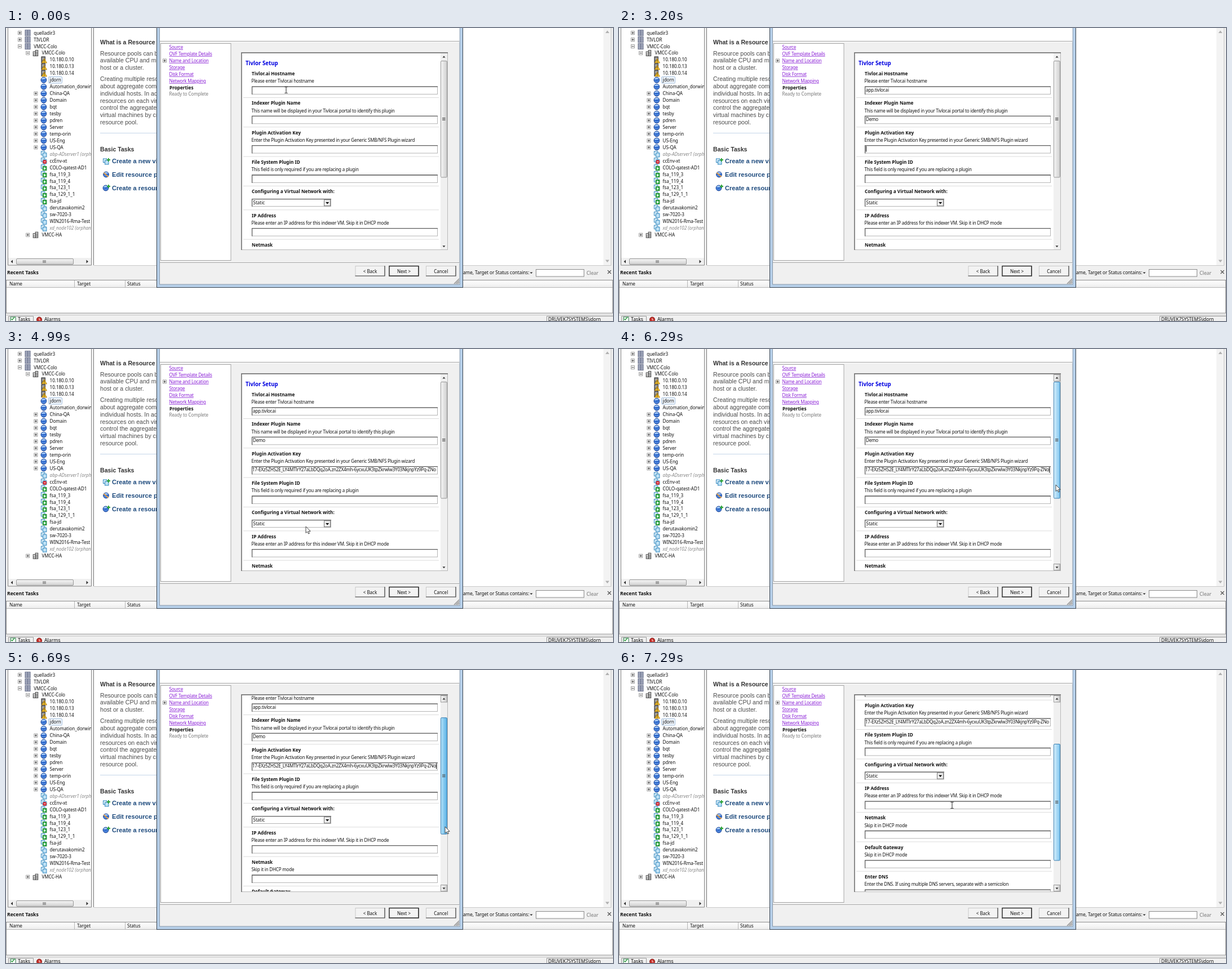
These frames come from a looping animation (1077x520 px, 7390 ms). An HTML page:

```html
<!DOCTYPE html>
<html lang="en">
<head>
<meta charset="utf-8">
<title>Deploy template: properties</title>
<style>
  html, body { margin: 0; width: 100%; height: 100%; overflow: hidden; background: #f0f0f0; }
  svg { display: block; width: 100%; height: 100%; }
  text { font: 8px "Noto Sans", "Open Sans", sans-serif; letter-spacing: -.18px; fill: #111; white-space: pre; }
  .tree { font-size: 8.1px; letter-spacing: -.04px; }
  .ital { font-style: italic; fill: #888; }
  .bold { font-size: 8.2px; font-weight: 700; letter-spacing: 0; }
  .title { font-size: 9.7px; font-weight: 700; letter-spacing: 0; fill: #0000e0; }
  .link { fill: #8a1fd6; text-decoration: underline; }
  .gray { fill: #777; }
  .btn { text-anchor: middle; letter-spacing: 0; }
  .key { letter-spacing: -.22px; }
  .page { font: 10.6px "Liberation Sans", Arial, sans-serif; letter-spacing: 0; fill: #4c4c4c; }
  .head { font-weight: 700; fill: #333; }
  .task { font-size: 11.1px; font-weight: 700; fill: #1d4a7d; }
  .bar { font-size: 8.2px; letter-spacing: -.06px; }
</style>
</head>
<body>
<svg id="stage" viewBox="0 0 1077 520" preserveAspectRatio="none"></svg>
<script>
const LOOP = 7390;
const stage = document.getElementById('stage');

const txt = (x, y, s, cls = '', more = '') =>
  `<text x="${x}" y="${y}" dy=".36em" class="${cls}" ${more}>${s}</text>`;
const box = (x, y, w, h, fill, stroke = 'none', more = '') =>
  `<rect x="${x}" y="${y}" width="${w}" height="${h}" fill="${fill}" stroke="${stroke}" ${more}/>`;
const line = (d, stroke, w = 1) =>
  `<path d="${d}" fill="none" stroke="${stroke}" stroke-width="${w}"/>`;
const shape = (d, fill, stroke = 'none', w = 1) =>
  `<path d="${d}" fill="${fill}" stroke="${stroke}" stroke-width="${w}"/>`;
const at = (x, y, s) => `<g transform="translate(${x} ${y})">${s}</g>`;
const clip = (id, x, y, w, h) => `<clipPath id="${id}">${box(x, y, w, h, '#000')}</clipPath>`;
const grad = (id, a, b, dir = 'x2="1" y2="0"') =>
  `<linearGradient id="${id}" x1="0" y1="0" ${dir}><stop stop-color="${a}"/><stop offset="1" stop-color="${b}"/></linearGradient>`;

const defs = `<defs>
  ${grad('idle', '#f6f6f6', '#cfcfcf')}${grad('hover', '#d8f0fc', '#7cc4ef')}${grad('drag', '#b4e2f9', '#58b1e6')}
  ${grad('flat', '#f6f6f6', '#cfcfcf', 'x2="0" y2="1"')}${grad('th', '#ffffff', '#ececec', 'x2="0" y2="1"')}
  ${clip('treeClip', 4, 0, 147, 408)}${clip('formClip', 419, 45, 351, 348)}${clip('keyClip', 437, 206, 328, 18)}
</defs>`;

// Tree icons, centred on 0,0
const vmBase = (edge, fill) =>
  box(-4.5, -5, 6.5, 6.5, '#e4f3fc', '#2f86bd') + box(-1.5, -2, 6.5, 7, fill, edge);
const icons = {
  dc: box(-4.5, -5, 9, 10, '#b9bfd0', '#5c6480') + line('M-4 -2.5H4M-4 0H4M-4 2.5H4M0 -5V5', '#5c6480', .8),
  cluster: box(-4.5, -2.5, 4, 7.5, '#eee', '#444') + box(-.5, -5, 4.5, 10, '#ddd', '#444') +
    line('M-3 0V4M1 -3V4M2.5 -3V4', '#666', .8),
  host: box(-4, -5.5, 6.5, 10.5, '#777', '#333') + line('M-3 -3H2M-3 -1H2', '#ddd', .8) +
    shape('M1 -2.5L5.5 5.5H-3.5Z', '#f7c52c', '#a06a00', .8) + line('M1 0V2.8M1 3.7V4.7', '#222', 1),
  pool: '<circle r="5" fill="#2d68cc" stroke="#1d428c" stroke-width=".8"/>' +
    shape('M-4.2 -1.4A4.5 4.5 0 0 1 3.9 -2Q0 -.8 -4.2 -1.4Z', '#a9ccf6') +
    line('M-4 1.6Q0 3.4 4 1.4', '#7fb0ef', .9),
  vm: vmBase('#2f86bd', '#bfe2f6'),
  run: vmBase('#16812b', '#35b04a') + shape('M.3 -1L4 1.5L.3 4Z', '#fff'),
  bad: vmBase('#2f86bd', '#e4f3fc') + '<circle cx="1.8" cy="1.8" r="3.4" fill="#d3202a"/>' + line('M0 1.8H3.6', '#fff')
};
const expander = (x, y, plus) => box(x - 3, y - 3, 6, 6, '#fff', '#888', 'stroke-width=".8"') +
  line(`M${x - 2} ${y}H${x + 2}` + (plus ? `M${x} ${y - 2}V${y + 2}` : ''), '#222', .9);

// level, icon, expander (+, - or blank), label
const rows = [
  [0, 'dc', '+', 'quelladir3'], [0, 'dc', '+', 'TIVLOR'], [0, 'dc', '-', 'VMCC-Colo'], [1, 'cluster', '-', 'VMCC-Colo'],
  ...[10, 13, 14].map(n => [2, 'host', '', '10.180.0.' + n]),
  [2, 'pool', '', 'jdorn'], [2, 'pool', '', 'Automation_dorwins'],
  ...['China-QA', 'Domain', 'bqt', 'tesby', 'pdren', 'Server', 'temp-orin', 'US-Eng', 'US-QA'].map(s => [2, 'pool', '+', s]),
  [2, 'vm', '', 'abp-ADserver1 (orphaned)'], [2, 'bad', '', 'ccEnv-xt'],
  ...['COLO-qatest-AD1', 'fsa_119_3', 'fsa_119_4', 'fsa_123_1', 'fsa_129_1_1', 'fsa-jd'].map(s => [2, 'run', '', s]),
  ...['derutavakomin2', 'sw-7020-3', 'WIN2016-Rma-Test', 'xd_node102 (orphaned)'].map(s => [2, 'vm', '', s]),
  [1, 'cluster', '+', 'VMCC-HA']
];

function tree() {
  let s = box(4, 0, 147, 421, '#fff') + box(75.5, 86.5, 24, 11.5, '#f0f6fd', '#a5c0de', 'rx="1.5"');
  rows.forEach(([level, icon, exp, label], i) => {
    const y = 8.7 + i * 11.95, x = 24.5 + level * 14.2;
    if (exp) s += expander(x, y, exp === '+');
    s += at(x + 14, y, icons[icon]) + txt(x + 24.7, y, label, label.includes('(') ? 'tree ital' : 'tree');
  });
  return `<g clip-path="url(#treeClip)">${s}</g>` +
    box(4, 408, 147, 13, '#f0f0f0') + box(18.5, 409.5, 101, 10, 'url(#flat)', '#999', 'rx="1.5"') +
    line('M66 412V417M68 412V417M70 412V417', '#555', .9) +
    shape('M12 411.5V417.5L8.5 414.5ZM142.5 411.5V417.5L146 414.5Z', '#333') +
    line('M3.5 0V421H151.5V0', '#888');
}

function page() {
  const body = [
    [45, 'Resource pools can be used'], [57.5, 'available CPU and memory'], [70.5, 'host or a cluster.'],
    [90.5, 'Creating multiple resource'], [103.3, 'about aggregate computing'], [116, 'individual hosts. In addition'],
    [128.8, 'resources on each virtual'], [141.5, 'control the aggregate for'], [154.2, 'virtual machines by creating'],
    [167, 'resource pool.']
  ];
  const plus = shape('M4 -6H6V-4H8V-2H6V0H4V-2H2V-4H4Z', '#2fa33a');
  return box(156, 0, 917, 421, '#fff') + line('M155.5 0V421', '#777') +
    txt(167, 25, 'What is a Resource Pool?', 'page head') +
    body.map(([y, s]) => txt(167, y, s, 'page')).join('') +
    line('M167 186.5H300', '#c4d6ea') + txt(167, 215, 'Basic Tasks', 'page head') +
    at(177, 237, icons.vm + plus) + txt(188, 236.5, 'Create a new virtual', 'page task') +
    at(177.5, 260, icons.pool + line('M-4 -3L4 4', '#e59a3c', 2)) + txt(188, 260.3, 'Edit resource pool', 'page task') +
    at(177, 284, icons.pool + plus) + txt(188, 284.2, 'Create a resource', 'page task') +
    box(1060, 0, 13, 421, '#f3f3f3') + shape('M1063.5 9H1070.5L1067 4.5ZM1063.5 411.5H1070.5L1067 416Z', '#b0b0b0') +
    line('M156 421.5H1073.5V0', '#c8c8c8');
}

function bottom() {
  return box(0, 422, 1077, 98, '#f0f0f0') + txt(2, 434, 'Recent Tasks', 'bold', 'style="font-size:8.7px"') +
    txt(804.9, 434.5, 'Name, Target or Status contains:', 'bar') + shape('M929.5 433.5H934.5L932 436Z', '#222') +
    box(940.5, 428.5, 85, 12.5, '#fff', '#8a8a8a') + txt(1030, 434.8, 'Clear', 'bar gray', 'style="font-size:8.8px"') +
    line('M1067.5 430L1073.5 436M1073.5 430L1067.5 436', '#555', 1.2) +
    box(0.5, 447.5, 1076, 58.5, '#fff', '#8a8a8a') + box(1, 448, 1075, 12.5, 'url(#th)') +
    line('M1 460.5H1076M121.5 448V460M211.5 448V460', '#b5b5b5') +
    txt(6, 454.5, 'Name', 'bar') + txt(126, 454.5, 'Target', 'bar') + txt(215, 454.5, 'Status', 'bar') +
    line('M0 509.5H1077', '#c4c4c4') + line('M4.5 520V511.5H48.5V520', '#999') +
    box(8, 513, 9, 8, '#fff', '#2c7a4a') + line('M9 516L11 518L15 513', '#2a9a3c', 1.3) +
    txt(21, 517.3, 'Tasks', 'bar', 'style="font-size:8.8px"') +
    '<circle cx="59" cy="517.5" r="4.5" fill="#c8312b" stroke="#7d1a17"/>' + line('M59 515V518H61', '#fff', .9) +
    txt(68, 517.3, 'Alarms', 'bar', 'style="font-size:8.8px"') +
    line('M959.5 520V511.5H1077', '#999') + txt(962, 517, 'DRUVEK7SYSTEMS\\jdorn', 'bar');
}

const groups = [
  ['Tivlor.ai Hostname', 'Please enter Tivlor.ai hostname'],
  ['Indexer Plugin Name', 'This name will be displayed in your Tivlor.ai portal to identify this plugin'],
  ['Plugin Activation Key', 'Enter the Plugin Activation Key presented in your Generic SMB/NFS Plugin wizard'],
  ['File System Plugin ID', 'This field is only required if you are replacing a plugin'],
  ['Configuring a Virtual Network with:', ''],
  ['IP Address', 'Please enter an IP address for this indexer VM. Skip it in DHCP mode'],
  ['Netmask', 'Skip it in DHCP mode'],
  ['Default Gateway', 'Skip it in DHCP mode'],
  ['Enter DNS', 'Enter the DNS. If using multiple DNS servers, separate with a semicolon']
];
const FIELD_Y = [110, 162.3, 214.6];

const input = (x, y, w, h) => box(x + .5, y + .5, w - 1, h - 1, '#fff', '#b4b4b4') +
  line(`M${x + .6} ${y + h}V${y + .6}H${x + w}`, '#5f5f5f', 1.3);

function form() {
  let s = txt(425, 62.5, 'Tivlor Setup', 'title'), y = 81;
  groups.forEach(([head, note]) => {
    s += txt(436, y, head, 'bold');
    if (note) {
      s += txt(435.5, y + 13.5, note) + input(436, y + 22.5, 330, 14.5);
    } else {
      s += input(436, y + 12.8, 141, 14) + txt(438.5, y + 20, 'Static', '', 'style="letter-spacing:0"') +
        box(564.5, y + 14.5, 11, 11, '#ececec', '#777') + shape(`M567.2 ${y + 18.8}h6l-3 3.4z`, '#000');
    }
    const step = note ? 52.3 : 42.4;
    s += line(`M421 ${y + step - 9.8}H768`, '#dcdcdc');
    y += step;
  });
  FIELD_Y.forEach((fy, i) => {
    const t = txt(i === 2 ? 437 : 438, fy, '', i === 2 ? 'key' : '', `id="field${i}"`);
    s += i === 2 ? `<g clip-path="url(#keyClip)">${t}</g>` : t;
  });
  return s + box(0, 0, 1, 10, '#000', 'none', 'id="caret"');
}

function dialog() {
  const links = ['Source', 'OVF Template Details', 'Name and Location', 'Storage', 'Disk Format', 'Network Mapping'];
  const button = (x, w, label, main) => box(x + .5, 422.5, w - 1, 17.5, '#f3f3f3', main ? '#222' : '#c9c9c9', main ? 'stroke-width="1.4"' : '') +
    line(`M${x} 440H${x + w - .5}V422`, '#444', 1.2) + txt(x + w / 2, 431.8, label, 'btn');
  return box(267.5, -2, 543, 462.5, '#b7d0ea', '#37424e') +
    box(272.5, -2, 532.5, 457, '#f0f0f0', '#8797a8') + box(273, 0, 531.5, 23, '#fff') +
    line('M273 23.5H804.5', '#a0a0a0') + line('M273 24.5H804.5', '#fff') +
    box(274.5, 27.5, 124.5, 385, '#fff', '#a5a5a5') +
    links.map((s, i) => txt(289.5, 34 + i * 12, s, 'link')).join('') + expander(281.5, 58, true) +
    txt(290, 105.8, 'Properties', 'bold') + txt(289.5, 117.6, 'Ready to Complete', 'gray', 'style="letter-spacing:-.1px"') +
    line('M273 416.5H804.5', '#a0a0a0') + line('M273 417.5H804.5', '#fff') +
    button(619.5, 53, '&lt; Back') + button(679.5, 53, 'Next &gt;', true) + button(745, 53.5, 'Cancel') +
    line('M795 454L804 445M798 454L804 448M801 454L804 451', '#888', 1.1) +
    box(417.5, 43.5, 366, 350, '#fff', '#b8b8b8') + line('M418 394V44H784', '#6b6b6b', 1.4) +
    `<g clip-path="url(#formClip)"><g id="form">${form()}</g></g>` +
    box(771, 45, 12, 348, '#f0f0f0') +
    `<g id="arrows">${box(771.5, 45.5, 11, 11.5, 'url(#idle)', '#999')}${box(771.5, 381.5, 11, 11, 'url(#idle)', '#999')}</g>` +
    shape('M774.5 52.5H779.5L777 49.5ZM774.5 386.3H779.5L777 389.3Z', '#333') +
    `<g id="thumb">${box(771.5, 58.5, 11, 206.5, 'url(#idle)', '#979797', 'id="grab" rx="1.5"')}
      ${line('M774 159.5H779.5M774 161.5H779.5M774 163.5H779.5', '#444', .9)}</g>`;
}

stage.innerHTML = defs + page() + tree() + bottom() + dialog() +
  `<g id="arrow">${shape('M0 0V11.5L2.7 9.1L4.6 13L6.4 12.2L4.6 8.4H8.2Z', '#fff', '#333', .9)}</g>` +
  `<g id="beam">${line('M-2.5 -5.5H-.7L0 -5L.7 -5.5H2.5M0 -5V5M-2.5 5.5H-.7L0 5L.7 5.5H2.5', '#222', 1)}</g>`;

const el = id => document.getElementById(id);
const show = (id, on) => el(id).setAttribute('visibility', on ? 'visible' : 'hidden');
const move = (id, x, y) => el(id).setAttribute('transform', `translate(${x} ${y})`);

const HOST = 'app.tivlor.ai';
const KEY = '17-EXz5ZHS2E_LY4MTlrY27aLbDQq2oA.zn2ZX4mh-6ycxuUK3tpZkrwlw3Y03NkjnpYz9Pq-ZNo';
// [time, value]: hard changes
const hostLen = [[0, 0], [1100, 1], [1200, 2], [1400, 4], [1500, 6], [1600, 8], [1700, 9], [1800, 11], [2000, 13]];
const nameLen = [[0, 0], [2700, 1], [2800, 2], [2900, 3], [3000, 4]];
const caretIn = [[0, -1], [800, 0], [2400, 1], [3200, 2], [4590, -1], [5190, 2], [5690, -1], [6290, 2], [6790, -1]];
// [time, ...values]: interpolated
const scrollKeys = [[6390, 0], [6490, 10], [6690, 44], [6890, 85], [7090, 117], [7190, 122.5]];
const mouseKeys = [
  [4790, 505, 150], [4990, 532, 315], [5190, 543, 385], [5290, 546, 397], [5490, 553, 375], [5790, 620, 340],
  [6090, 745, 262], [6290, 775, 241], [6390, 777, 252], [6690, 779, 278], [6890, 780, 303], [7090, 779, 322],
  [7190, 700, 285], [7290, 591, 240]
];

const hold = (keys, t) => keys.filter(k => k[0] <= t).pop()[1];
function tween(keys, t) {
  const i = keys.findIndex(k => k[0] > t);
  if (i === 0) return keys[0].slice(1);
  if (i < 0) return keys[keys.length - 1].slice(1);
  const a = keys[i - 1], b = keys[i], p = (t - a[0]) / (b[0] - a[0]);
  return a.slice(1).map((v, j) => v + (b[j + 1] - v) * p);
}

function draw(now) {
  let t = now % LOOP;
  if (t >= 4790) t = 4790 + Math.floor((t - 4790) / 100) * 100;

  const values = [HOST.slice(0, hold(hostLen, t)), 'Demo'.slice(0, hold(nameLen, t)), t >= 4200 ? KEY : ''];
  values.forEach((v, i) => {
    const f = el('field' + i);
    if (f.textContent !== v) f.textContent = v;
  });

  const c = hold(caretIn, t);
  show('caret', c >= 0);
  if (c >= 0) {
    const w = values[c] ? el('field' + c).getComputedTextLength() : 0;
    move('caret', Math.min(438 + w, 763), FIELD_Y[c] - 5);
  }

  const [scroll] = tween(scrollKeys, t);
  move('form', 0, -scroll);
  move('thumb', 0, scroll * .596);
  const hot = t >= 6190, dragging = t >= 6390 && t < 7190;
  el('grab').setAttribute('fill', `url(#${dragging ? 'drag' : hot ? 'hover' : 'idle'})`);
  el('grab').setAttribute('stroke', hot ? '#3c7fb1' : '#979797');
  show('arrows', hot);

  const [mx, my] = t < 4790 ? [497, 110] : tween(mouseKeys, t);
  const beam = t < 1000 || t >= 7290;
  show('beam', beam);
  show('arrow', !beam && t >= 4790);
  move('beam', mx, my);
  move('arrow', mx, my);
}

function frame() {
  draw(performance.now());
  requestAnimationFrame(frame);
}
frame();
</script>
</body>
</html>
```
